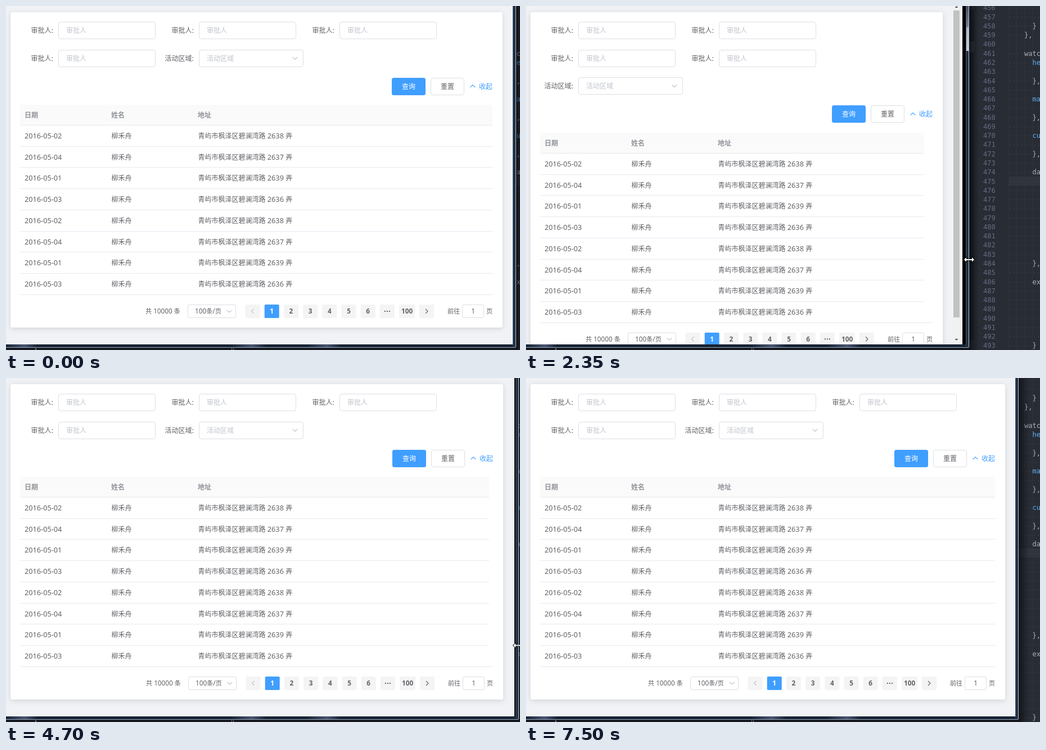
These frames come from a looping animation (914 by 613 pixels, 7.58 s). An HTML page with a canvas:

```html
<!DOCTYPE html>
<html lang="zh-CN">
<head>
<meta charset="utf-8">
<style>
html, body { margin: 0; width: 100%; height: 100%; overflow: hidden; background: #282c34; }
canvas { display: block; }
</style>
</head>
<body>
<canvas id="stage" width="914" height="613"></canvas>
<script>
const ctx = document.getElementById('stage').getContext('2d');
const LOOP = 7580, BLUE = '#409eff', BORDER = '#dcdfe6', TEXT = '#606266', HINT = '#c0c4cc';

// Right edge of the dragged window: [time, x]
const EDGE = [[660, 907], [1370, 822], [1600, 783], [1660, 747], [1850, 702], [2220, 765], [2300, 781.5],
  [2350, 788], [2900, 900], [3190, 922], [3260, 931], [3320, 938], [3500, 945], [3900, 828], [3980, 856],
  [4050, 870], [4110, 864], [4250, 838], [4520, 897], [4700, 912], [4870, 912], [5320, 827], [5395, 829],
  [5450, 857], [5700, 930], [6050, 822], [6220, 882], [6330, 876]];
const HAND = [[660, 461], [1660, 453], [2350, 452], [4110, 473], [5450, 480], [6330, 484]];
const BEATS = [660, 1660, 2350, 3320, 4110, 5450, 6430];

const slope = (k, i) => k[i] && k[i + 1] ? (k[i + 1][1] - k[i][1]) / (k[i + 1][0] - k[i][0]) : 0;
function tangent(k, i) {
  const a = slope(k, i - 1), b = slope(k, i);
  return a * b <= 0 ? 0 : 2 * a * b / (a + b);
}

// Monotone cubic interpolation through the keys
function curve(k, t) {
  const last = k.length - 1;
  if (t <= k[0][0]) return k[0][1];
  if (t >= k[last][0]) return k[last][1];
  const i = k.findIndex(p => p[0] > t) - 1, d = k[i + 1][0] - k[i][0], u = (t - k[i][0]) / d;
  const s = u * u * (3 - 2 * u);
  return k[i][1] * (1 - s) + k[i + 1][1] * s +
    d * u * (1 - u) * (tangent(k, i) * (1 - u) - tangent(k, i + 1) * u);
}

// The window repaints in steps of about 48 ms
function repaintTime(t) {
  const i = BEATS.findIndex(b => b > t);
  if (i < 1) return t;
  const a = BEATS[i - 1], span = BEATS[i] - a, n = Math.round(span / 48);
  return a + Math.floor((t - a) / span * n) * span / n;
}

function rect(x, y, w, h, color) {
  ctx.fillStyle = color;
  ctx.fillRect(x, y, w, h);
}

function box(x, y, w, h, fill, stroke, r = 3.5) {
  const o = stroke ? 0.5 : 0;
  ctx.beginPath();
  ctx.roundRect(x + o, y + o, w - 2 * o, h - 2 * o, r);
  ctx.fillStyle = fill;
  ctx.fill();
  if (!stroke) return;
  ctx.strokeStyle = stroke;
  ctx.lineWidth = 1;
  ctx.stroke();
}

function shape(points, fill, stroke) {
  ctx.beginPath();
  points.forEach(([x, y]) => ctx.lineTo(x, y));
  ctx.closePath();
  if (stroke) {
    ctx.strokeStyle = stroke;
    ctx.lineWidth = 1.6;
    ctx.stroke();
  }
  ctx.fillStyle = fill;
  ctx.fill();
}

// Gradient running from (x0, y0) to (x1, y1) through [offset, color] stops
function gradient(x0, y0, x1, y1, stops) {
  const g = ctx.createLinearGradient(x0, y0, x1, y1);
  stops.forEach(([at, color]) => g.addColorStop(at, color));
  return g;
}

// Latin runs are set slightly larger than the Chinese ones
function text(s, x, y, color = TEXT, { size = 12, weight = 400, align = 0 } = {}) {
  const runs = s.match(/[\x00-\xff]+|[^\x00-\xff]+/g).map(run => {
    const font = run.charCodeAt(0) < 256
      ? `${weight} ${size * 1.06}px "Noto Sans", sans-serif`
      : `${weight} ${size}px "Noto Sans CJK SC", "Noto Sans CJK", "Noto Sans CJK JP", sans-serif`;
    ctx.font = font;
    return { run, font, width: ctx.measureText(run).width };
  });
  x -= align * runs.reduce((sum, r) => sum + r.width, 0);
  ctx.fillStyle = color;
  for (const r of runs) {
    ctx.font = r.font;
    ctx.fillText(r.run, x, y + size * 0.38);
    x += r.width;
  }
}

function chevron(x, y, dx, dy, color = HINT) {
  ctx.beginPath();
  if (dy) {
    ctx.moveTo(x - 4.5, y - dy);
    ctx.lineTo(x, y + dy);
    ctx.lineTo(x + 4.5, y - dy);
  } else {
    ctx.moveTo(x - dx, y - 4);
    ctx.lineTo(x + dx, y);
    ctx.lineTo(x - dx, y + 4);
  }
  ctx.strokeStyle = color;
  ctx.lineWidth = 1.1;
  ctx.stroke();
}

const CODE = { 458: [6, '}'], 459: [4, '},'], 460: [0, ''], 461: [4, 'watch'], 462: [6, 'height', 1], 464: [6, '},'],
  466: [6, 'max', 1], 468: [6, '},'], 470: [6, 'current', 1], 472: [6, '},'], 474: [6, 'data'],
  484: [6, '},'], 486: [6, 'export'], 493: [6, '}'] };

function drawEditor() {
  rect(0, 0, 914, 613, '#21252b');
  rect(0, 0, 797, 7, '#2c313a');
  rect(0, 63, 797, 19, '#2f343e');
  rect(0, 594, 797, 19, '#2a2e36');
  rect(797, 0, 117, 613, '#282c34');
  rect(858, 304, 56, 16, '#2f343d');
  for (const x of [858, 872, 886, 900]) rect(x, 0, 1, 613, '#2f343d');
  ctx.font = '12px "DejaVu Sans Mono", monospace';
  for (let n = 456; n <= 493; n++) {
    const y = 3 + (n - 456) * 16.27, [indent, code, call] = CODE[n] || [8, ''];
    ctx.fillStyle = '#636d83';
    ctx.fillText(n, 813, y + 4.4);
    for (let i = 0; i < indent; i++) rect(860 + i * 7.25, y, 1.3, 1.3, '#434954');
    ctx.fillStyle = call ? '#61afef' : '#abb2bf';
    ctx.fillText(code, 857 + indent * 7.25, y + 4.4);
  }
}

function drawFrame(edge) {
  const inner = edge - 6, clear = 'rgba(110,125,165,0)';
  rect(edge, 0, 18, 613, gradient(edge, 0, edge + 18, 0, [[0, 'rgba(0,0,0,.55)'], [1, 'rgba(0,0,0,0)']]));
  rect(0, 603, edge, 6, '#172233');
  rect(0, 609, edge, 4, '#14171d');
  for (const [x, w] of [[0, 55], [400, 62], [535, 60]]) {
    rect(x, 603, w, 5, gradient(x, 0, x + w, 0, [[0, clear], [0.6, 'rgba(110,125,165,.55)'], [1, clear]]));
  }
  rect(inner, 0, 6, 609, '#203044');
  if (edge < 870) {
    rect(inner + 1, 0, 4, 80, gradient(0, 0, 0, 80,
      [[0, '#4a5064'], [0.45, '#77809a'], [0.5, '#b4bac8'], [1, '#c8ccd6']]));
  }
  rect(inner, 0, 1, 604, '#45566b');
  rect(edge - 1, 0, 1, 608, '#b3c2d4');
  rect(0, 608, edge - 1, 1, '#9aaabd');
  rect(52, 610, 2, 3, '#6b7282');
  rect(401, 610, 1, 3, '#777e8c');
  rect(404, 610, 1, 3, '#777e8c');
}

function drawForm(columns) {
  for (let i = 0; i < 5; i++) {
    const x = 93 + i % columns * 250, y = 28 + Math.floor(i / columns) * 49.5, select = i === 4;
    const label = select ? '活动区域' : '审批人';
    text(label + ':', x - 9, y + 15.5, TEXT, { align: 1 });
    box(x, Math.round(y), select ? 186 : 173, 31, '#fff', BORDER);
    text(label, x + 14, y + 15.5, HINT);
    if (select) chevron(x + 171, y + 15.5, 0, 2.2);
  }
}

function drawActions(right, y) {
  const top = Math.round(y - 15.5);
  box(right - 179, top, 60, 31, BLUE);
  text('查询', right - 149, y, '#fff', { weight: 500, align: 0.5 });
  box(right - 110, top, 60, 31, '#fff', BORDER);
  text('重置', right - 80, y, TEXT, { weight: 500, align: 0.5 });
  chevron(right - 35, y, 0, -2.2, BLUE);
  text('收起', right, y, BLUE, { align: 1 });
}

function drawTable(right, tableRight, top, scrolls) {
  const line = (y, end) => rect(25, Math.round(y), end - 25, 1, '#e6e9f1');
  rect(25, top, tableRight - 25, 36, '#fafafa');
  ['日期', '姓名', '地址'].forEach((s, i) => text(s, 33 + i * 154, top + 18.5, '#909399', { weight: 700 }));
  line(top + 36, tableRight);
  for (let i = 0; i < 8; i++) {
    const y = top + 55.5 + i * 37.7, k = i % 4;
    text('2016-05-0' + [2, 4, 1, 3][k], 33, y);
    text('柳禾舟', 187.5, y);
    text(`青屿市枫泽区碧澜湾路 ${[2638, 2637, 2639, 2636][k]} 弄`, 341.5, y);
    line(top + 36 + (i + 1) * 37.7, i === 7 ? right : tableRight);
  }
  if (!scrolls) return;
  const y = top + 338;
  rect(25, y, right - 25, 15, '#f1f1f1');
  rect(39, y + 2, right - 58, 11, '#c1c1c1');
  shape([[30, y + 7.5], [33, y + 4.5], [33, y + 10.5]], '#505050');
  shape([[right - 5, y + 7.5], [right - 8, y + 4.5], [right - 8, y + 10.5]], '#505050');
}

function drawPager(right, y) {
  const small = { size: 11.1 }, bold = { size: 11.1, weight: 700, align: 0.5 }, top = Math.round(y - 12);
  text('共 10000 条', right - 617, y, TEXT, small);
  box(right - 542, top, 86, 24, '#fff', BORDER, 2.5);
  text('100条/页', right - 529, y, TEXT, small);
  chevron(right - 468, y, 0, 1.8);
  ['<', '1', '2', '3', '4', '5', '6', '.', '100', '>'].forEach((s, i) => {
    const x = right - 439.5 + i * 34.2 + (i === 9 ? 1.7 : 0), w = s === '100' ? 28 : 26, mid = x + w / 2;
    box(x, top, w, 24, s === '1' ? BLUE : '#f4f4f5', null, 1.7);
    if (s === '<') chevron(mid, y, -2, 0);
    else if (s === '>') chevron(mid, y, 2, 0, TEXT);
    else if (s === '.') for (const d of [-4, 0, 4]) rect(mid + d - 1, y - 1, 2, 2, TEXT);
    else text(s, mid, y, s === '1' ? '#fff' : TEXT, bold);
  });
  text('前往', right - 80, y, TEXT, small);
  box(right - 54, top, 39, 24, '#fff', BORDER, 2.5);
  text('1', right - 34.5, y, TEXT, { size: 11.1, align: 0.5 });
  text('页', right, y, TEXT, { size: 11.1, align: 1 });
}

// Paint, layout and table width each trail the window edge a little more
function drawPage(t, edge) {
  const laid = curve(EDGE, t - 60), lagged = curve(EDGE, t - 130);
  const narrow = laid < 831, gap = narrow ? 57 : 42, shift = narrow ? 49.5 : 0;
  const right = Math.round(laid - gap), tableRight = Math.min(right, Math.round(lagged - gap));
  const scrolls = lagged - laid > 1, push = scrolls ? 15 : 0;
  const painted = Math.round(Math.min(edge, curve(EDGE, t - 45))) - 6;

  rect(0, 0, edge, 603, '#000');
  ctx.save();
  ctx.beginPath();
  ctx.rect(0, 0, painted, 603);
  ctx.clip();
  rect(0, 0, 914, 603, '#f0f2f5');
  ctx.shadowColor = 'rgba(0,0,0,.13)';
  ctx.shadowBlur = 10;
  ctx.shadowOffsetY = 2;
  box(8, 11, right + 10, 562 + shift + push, '#fff');
  ctx.shadowColor = 'transparent';
  drawForm(narrow ? 2 : 3);
  drawActions(right, 143 + shift);
  drawTable(right, tableRight, Math.round(176 + shift), scrolls);
  drawPager(right, 544 + shift + push);
  if (narrow) {
    const x = right + 36, mid = x + 6.5;
    rect(x, 0, 30, 603, '#f1f1f1');
    rect(x + 1, 8, 11, 547, '#c1c1c1');
    shape([[mid - 3, 3], [mid + 3, 3], [mid, 0]], '#505050');
    shape([[mid - 3, 593], [mid + 3, 593], [mid, 596]], '#505050');
  }
  ctx.restore();
}

const ARROW = [[0, 0], [0, 15], [3.5, 11.8], [6, 17], [8.4, 16], [6, 10.9], [10.6, 10.9]];
const RESIZE = [[-9, 0], [-5, -4], [-5, -1], [5, -1], [5, -4], [9, 0], [5, 4], [5, 1], [-5, 1], [-5, 4]];

function drawCursor(time, t) {
  const at = (points, x, y) => shape(points.map(p => [p[0] + x, p[1] + y]), '#fff', '#000');
  if (time < 30 || time >= 6840) return;
  if (time < 400) {
    const u = (time - 30) / 370, s = u * (2 - u);
    at(ARROW, 872 + 32 * s, 594 - 133 * s);
  } else if (time < 6740) {
    at(RESIZE, Math.round(curve(EDGE, t + 6)) - 1, curve(HAND, t));
  } else {
    at(ARROW, 876 + (time - 6740) * 0.03, 500 + (time - 6740) * 0.42);
  }
}

function draw() {
  const time = performance.now() % LOOP, t = repaintTime(time), edge = Math.round(curve(EDGE, t));
  drawEditor();
  drawPage(t, edge);
  drawFrame(edge);
  drawCursor(time, t);
  requestAnimationFrame(draw);
}
requestAnimationFrame(draw);
</script>
</body>
</html>
```
